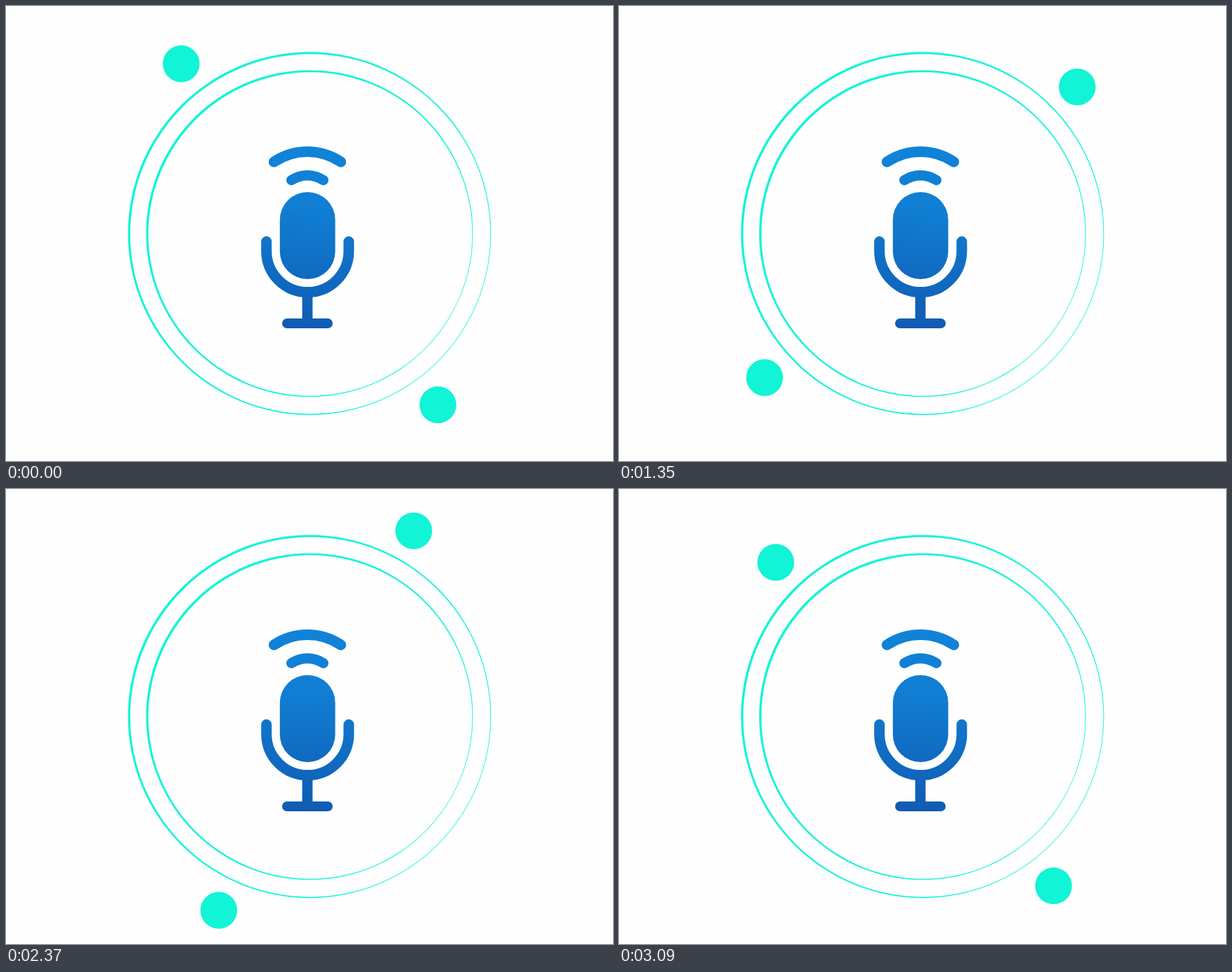
Write an HTML page with a canvas that moves like this. It is 864 by 648 pixels and loops after 3120 ms.

```html
<!DOCTYPE html>
<html lang="en">
<head>
<meta charset="utf-8">
<title>Voice</title>
<style>
  html, body { margin: 0; width: 100%; height: 100%; overflow: hidden; background: #fefefe; }
  canvas { display: block; }
</style>
</head>
<body>
<canvas id="stage" width="864" height="648"></canvas>
<script>
const ctx = document.getElementById('stage').getContext('2d');
const LOOP = 3120, STEP = 30;
const MINT = '#11f4d6';
const TAU = Math.PI * 2;
const rad = deg => deg * Math.PI / 180;

const blue = ctx.createLinearGradient(436, 200, 424, 460);
blue.addColorStop(0, '#1083d9');
blue.addColorStop(0.35, '#107ed3');
blue.addColorStop(1, '#105bb2');

// Slow start, fast middle, slight slowdown at the end.
const ease = u => u * u * (1.0359 + 0.8391 * u - 0.875 * u * u);

// A ring whose hole is shifted, so it thins out to the lower right.
function ring(r) {
  ctx.beginPath();
  ctx.arc(432, 324, r, 0, TAU);
  ctx.arc(433.15, 324.7, r - 2.1, 0, TAU);
  ctx.fillStyle = MINT;
  ctx.fill('evenodd');
}

function dot(deg) {
  const a = rad(deg);
  ctx.beginPath();
  ctx.arc(432.3 + 303.9 * Math.cos(a), 325 + 303.9 * Math.sin(a), 26.2, 0, TAU);
  ctx.fillStyle = MINT;
  ctx.fill();
}

// Upward bow given by its half chord and height.
function wave(top, half, sag, width) {
  const r = (half * half + sag * sag) / (2 * sag);
  const a = Math.asin(half / r);
  ctx.lineWidth = width;
  ctx.beginPath();
  ctx.arc(429, top + r, r, -Math.PI / 2 - a, -Math.PI / 2 + a);
  ctx.stroke();
}

function mic() {
  ctx.strokeStyle = ctx.fillStyle = blue;
  ctx.lineCap = 'round';
  wave(207.6, 47.6, 14.5, 15);
  wave(241.2, 22.8, 6.8, 14.5);

  ctx.beginPath();
  ctx.roundRect(389.8, 265, 78.8, 124, 39.4);
  ctx.fill();

  ctx.lineWidth = 15;
  ctx.beginPath();
  ctx.moveTo(370.7, 335.5);
  ctx.arc(429.3, 349, 58.6, Math.PI, 0, true);
  ctx.lineTo(487.9, 335.5);
  ctx.stroke();

  ctx.fillRect(421.6, 410, 14.8, 40);
  ctx.lineWidth = 14;
  ctx.beginPath();
  ctx.moveTo(400, 452);
  ctx.lineTo(458, 452);
  ctx.stroke();
}

function draw() {
  const t = Math.floor(performance.now() % LOOP / STEP) * STEP;
  const p = ease(t / (LOOP - STEP));
  ctx.fillStyle = '#fefefe';
  ctx.fillRect(0, 0, 864, 648);
  ring(258.4);
  ring(232.6);
  mic();
  dot(233 + 353.5 * p);
  dot(53.1 + 359.1 * p);
  requestAnimationFrame(draw);
}
draw();
</script>
</body>
</html>
```
